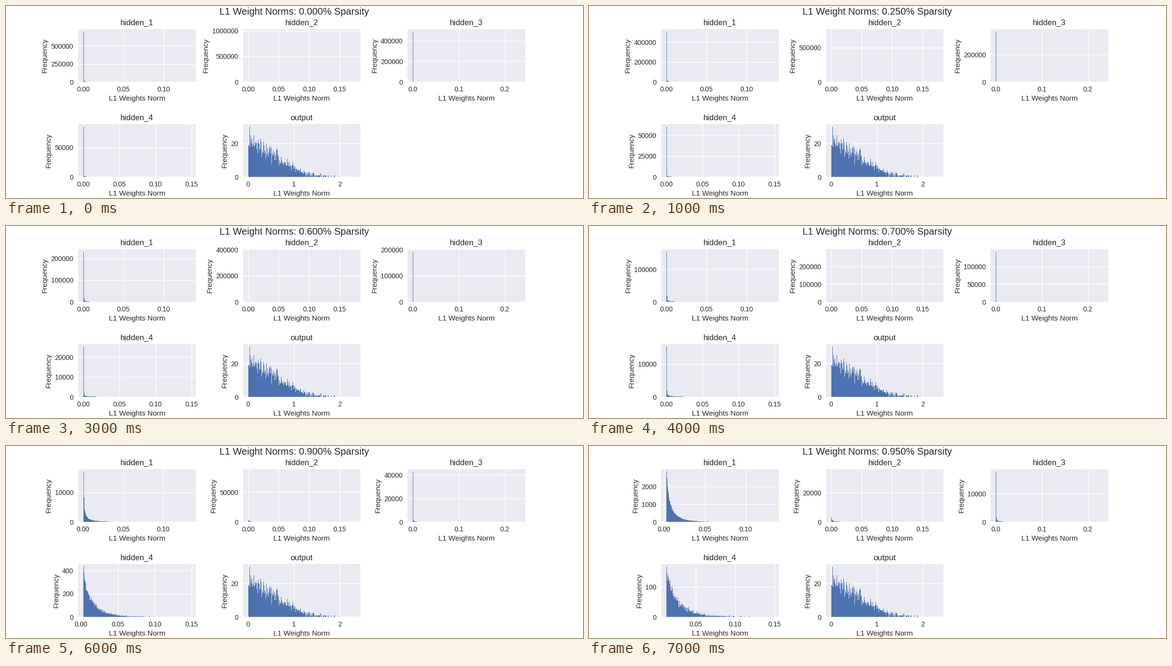
Animation, 1200 px wide and 400 px high, one loop 8 s. Source, as a matplotlib script:

```python
import numpy as np
import matplotlib.pyplot as plt
from matplotlib.animation import FuncAnimation

INK = "#262626"
BLUE = "#4C72B0"
BINS = 300
SPARSITY = [0, 0.25, 0.5, 0.6, 0.7, 0.8, 0.9, 0.95]

plt.rcParams.update({
    "font.family": "Liberation Sans",
    "text.color": INK,
    "axes.labelcolor": INK,
    "axes.facecolor": "#EAEAF2",
    "axes.linewidth": 0,
    "axes.grid": True,
    "axes.axisbelow": True,
    "axes.titlesize": 12,
    "axes.titlepad": 6,
    "axes.labelsize": 11,
    "axes.labelpad": 4,
    "axes.formatter.limits": (-7, 7),
    "grid.color": "white",
    "grid.linestyle": "-",
    "grid.linewidth": 1,
    "xtick.color": INK,
    "ytick.color": INK,
    "xtick.labelsize": 10,
    "ytick.labelsize": 10,
    "xtick.major.size": 0,
    "ytick.major.size": 0,
    "xtick.major.pad": 6.3,
    "ytick.major.pad": 7,
})

rng = np.random.default_rng(7)


class HiddenLayer:
    """Weight norms: a spike in the first bin and a random tail beyond it.

    With k the distance in bins, the tail falls off as
    k**-power * exp(-k / scale), raised near the spike by 1 + boost / k**2.
    """

    def __init__(self, size, n_tail, top, power, scale, boost):
        self.size, self.top = size, top
        k = np.geomspace(1, BINS, 3000)
        density = k**-power * np.exp(-k / scale) * (1 + boost / k**2)
        steps = (density[1:] + density[:-1]) / 2 * np.diff(k)
        cdf = np.concatenate([[0], np.cumsum(steps)])
        draws = np.interp(rng.random(n_tail), cdf / cdf[-1], k)
        self.tail = np.sort(draws * top / BINS)[::-1]
        self.tail[0] = top

    def histogram(self, sparsity):
        keep = round((1 - sparsity) * self.size)
        kept = self.tail[:keep]
        near_zero = keep - len(kept)
        low = 0 if near_zero else kept[-1]
        edges = np.linspace(low, self.top, BINS + 1)
        counts = np.histogram(kept, edges)[0]
        counts[0] += near_zero
        return edges, counts


class OutputLayer:
    """Half-normal weight norms that are never pruned."""

    def __init__(self, top, spread, level, peak):
        self.edges = np.linspace(0, top, BINS + 1)
        mean = level * np.exp(-(np.arange(BINS) / spread) ** 2 / 2)
        noisy = rng.normal(mean, 0.7 * np.sqrt(mean))
        self.counts = np.clip(np.round(noisy), 0, 1.25 * level)
        self.counts[3] = peak

    def histogram(self, sparsity):
        return self.edges, self.counts


LAYERS = {
    "hidden_1": HiddenLayer(784000, 80900, 0.1337, 0.8, 38, 1.3),
    "hidden_2": HiddenLayer(1000000, 15400, 0.1756, 1, 40, 0.1),
    "hidden_3": HiddenLayer(500000, 7150, 0.2327, 0.9, 27, 0),
    "hidden_4": HiddenLayer(100000, 14650, 0.1484, 0.35, 41, 2.8),
    "output": OutputLayer(top=2.342, spread=78, level=20, peak=30),
}

fig = plt.figure(figsize=(12, 4), dpi=100, facecolor="white")
fig.subplots_adjust(left=0.125, right=0.9, bottom=0.11, top=0.88,
                    wspace=0.4, hspace=0.8)
heading = fig.suptitle("", y=0.9925, fontsize=14.4)

panels = []
for i, (name, layer) in enumerate(LAYERS.items()):
    ax = fig.add_subplot(2, 3, i + 1)
    ax.set_title(name)
    ax.set_xlabel("L1 Weights Norm")
    ax.set_ylabel("Frequency")
    bars = ax.bar(np.arange(BINS), np.zeros(BINS), 1, align="edge",
                  color=BLUE, linewidth=0)
    panels.append((ax, bars, layer))


def update(i):
    sparsity = SPARSITY[i]
    heading.set_text(f"L1 Weight Norms: {sparsity:.3f}% Sparsity")
    for ax, bars, layer in panels:
        edges, counts = layer.histogram(sparsity)
        for bar, x, w, h in zip(bars, edges, np.diff(edges), counts):
            bar.set_bounds(x, 0, w, h)
        pad = (edges[-1] - edges[0]) / 20
        ax.set_xlim(edges[0] - pad, edges[-1] + pad)
        ax.set_ylim(0, counts.max() * 1.05)
    return []


anim = FuncAnimation(fig, update, frames=len(SPARSITY), interval=1000,
                     init_func=lambda: [], repeat=True, repeat_delay=0)
plt.show()
```
